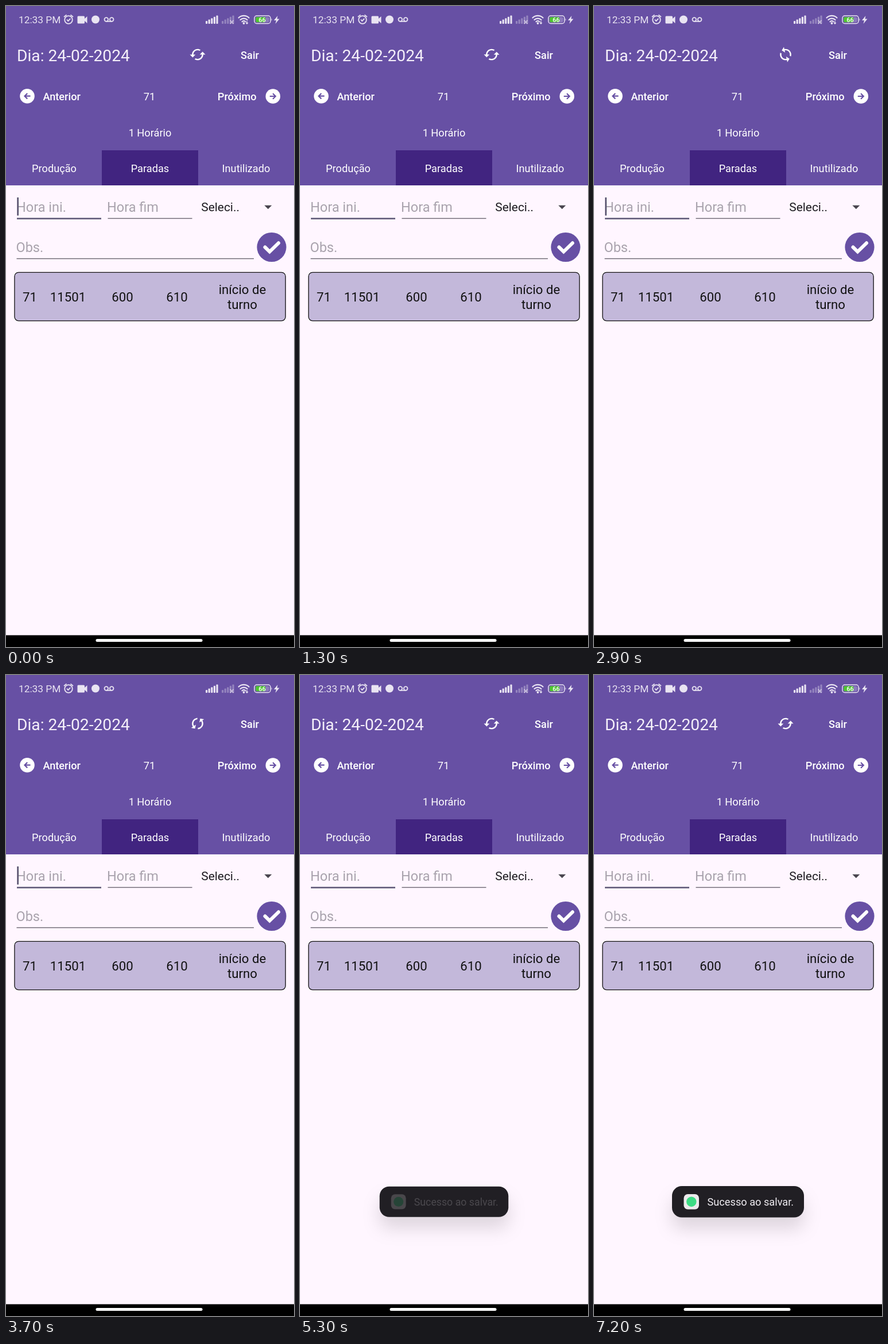
These frames come from a looping animation (502x1115 px, 7300 ms). An HTML page:

```html
<!DOCTYPE html>
<html lang="pt">
<head>
<meta charset="utf-8">
<style>
  html, body { margin: 0; width: 100%; height: 100%; overflow: hidden; background: #fff6ff; }
  svg { display: block; width: 502px; height: 1115px; font: 18.2px Roboto, sans-serif; }
  .m { text-anchor: middle; }
  .bold { font-weight: 500; }
  .status { fill: #e9e4f2; }
  .line { fill: none; stroke: #e9e4f2; stroke-width: 1.8; }
  .hint { font-size: 23.5px; fill: #a9a3ad; }
  .row { font-size: 22.2px; fill: #111; }
  #toast { transform-origin: 251px 916px; }
  #toast .box { filter: drop-shadow(0 20px 15px rgba(0, 0, 0, .13)); }
</style>
</head>
<body>
<svg viewBox="0 0 502 1115" fill="#fff">
  <rect width="502" height="1115" fill="#fff6ff"/>
  <rect width="502" height="312" fill="#6750a4"/>
  <rect x="167" y="251" width="168" height="61" fill="#412480"/>

  <!-- status bar -->
  <g class="status">
    <text x="22" y="30" font-size="17.3">12:33 PM</text>
    <g class="line">
      <circle cx="109" cy="24" r="6.8"/>
      <path d="M101 19l4.5-3.6M117 19l-4.5-3.6M106 23.5l2.3 2.6 4-4.2"/>
      <circle cx="174.800" cy="23.500" r="3.300"/>
      <circle cx="184.200" cy="23.500" r="3.300"/>
      <path d="M174.800 26.800h9.400"/>
    </g>
    <path d="M126 17.500h9.500q1.500 0 1.500 1.500v3l4.500-4v12l-4.500-4v3q0 1.500-1.500 1.500h-9.500q-1.500 0-1.500-1.500v-10q0-1.500 1.500-1.500z"/>
    <circle cx="156" cy="23.500" r="7"/>
    <g id="bars"></g>
    <path class="line" stroke-width="1.500" d="M390.500 25l6 6m0-6l-6 6" opacity=".65"/>
    <g class="line" stroke-linecap="round" style="stroke-width:2.2">
      <path d="M405.500 20.500a13 13 0 0 1 18 0M408.500 24a8.600 8.600 0 0 1 12 0M411.500 27.300a4.500 4.500 0 0 1 6 0"/>
    </g>
    <circle cx="414.500" cy="30" r="1.900"/>
    <path d="M420 26v5m-1.800-2l1.800 2 1.800-2" class="line" style="stroke-width:1.200"/>
    <rect class="line" x="433" y="17" width="28" height="13.500" rx="4" style="stroke-width:1.500"/>
    <rect x="435.300" y="19.200" width="23.400" height="9.100" rx="2" fill="#8d7bbd"/>
    <rect x="435.300" y="19.200" width="17" height="9.100" rx="2" fill="#4fc431"/>
    <path d="M462.500 21.500q2 2.200 0 4.500z"/>
    <text class="m bold" x="446.500" y="28" font-size="11" fill="#fff">66</text>
    <path d="M473.500 17l-6.500 8h4l-1.500 6 7-8.500h-4z"/>
  </g>

  <!-- header -->
  <text x="19" y="95.500" font-size="28.200" fill="#f5f0fa">Dia: 24-02-2024</text>
  <g id="sync">
    <path transform="scale(1.230) translate(-12 -12)" d="M19 8l-4 4h3c0 3.310-2.690 6-6 6-1.010 0-1.970-.250-2.800-.700l-1.460 1.460C8.970 19.540 10.430 20 12 20c4.420 0 8-3.580 8-8h3zM6 12c0-3.310 2.690-6 6-6 1.010 0 1.970.250 2.800.700l1.460-1.460C15.030 4.460 13.570 4 12 4c-4.420 0-8 3.580-8 8H1l4 4 4-4z"/>
  </g>
  <g class="bold">
    <text class="m" x="425" y="91.500">Sair</text>
    <text x="64.500" y="164">Anterior</text>
    <text x="368.800" y="164">Próximo</text>
  </g>
  <circle cx="37" cy="156.700" r="12.800"/>
  <circle cx="465.300" cy="157" r="12.800"/>
  <g fill="none" stroke="#6750a4" stroke-width="2.200">
    <path d="M42.500 156.700h-9.500m4.200-4.700l-4.700 4.700 4.700 4.700"/>
    <path d="M459.800 157h9.500m-4.200-4.700l4.700 4.700-4.700 4.700"/>
  </g>
  <g class="m">
    <text x="250" y="164">71</text>
    <text x="251" y="227">1 Horário</text>
    <text x="84" y="289">Produção</text>
    <text x="251" y="289">Paradas</text>
    <text x="418.500" y="289">Inutilizado</text>
  </g>

  <!-- form -->
  <g class="hint">
    <text x="18" y="358">Hora ini.</text>
    <text x="176" y="358">Hora fim</text>
    <text x="17.500" y="428">Obs.</text>
  </g>
  <g fill="#6a6570">
    <rect x="19" y="368.500" width="147" height="2.600" fill="#5f5a78"/>
    <rect x="177.500" y="368.800" width="147" height="1.400"/>
    <rect x="18.500" y="438.800" width="413.500" height="1.400"/>
  </g>
  <rect id="cursor" x="19.300" y="333" width="2.700" height="31.500" fill="#5a5570"/>
  <text x="340.300" y="357.300" font-size="20.900" fill="#1d1b20">Seleci..</text>
  <path d="M450.300 346.700h13l-6.500 6.600z" fill="#49454f"/>
  <circle cx="463" cy="419.500" r="25.600" fill="#6750a4"/>
  <path d="M451.500 419.500l8 7.800 15.500-15" fill="none" stroke="#fff" stroke-width="6" stroke-linecap="round"/>

  <!-- entry -->
  <rect x="14.900" y="463.300" width="472.300" height="84.300" rx="7" fill="#c3b8da" stroke="#111" stroke-width="1.300"/>
  <g class="row m">
    <text x="41.500" y="514">71</text>
    <text x="108" y="514">11501</text>
    <text x="203" y="514">600</text>
    <text x="298" y="514">610</text>
    <text x="412" y="501.300">início de</text>
    <text x="412" y="527.300">turno</text>
  </g>

  <!-- toast -->
  <g id="toast">
    <rect class="box" x="136" y="889" width="230" height="54.500" rx="17" fill="#211f24"/>
    <g id="message">
      <rect x="156.500" y="903" width="26.500" height="26.500" rx="7" fill="#eceaec"/>
      <circle cx="169.800" cy="916.200" r="8.700" fill="#3ddc84"/>
      <text x="197.500" y="923" fill="#f0edf2">Sucesso ao salvar.</text>
    </g>
  </g>

  <rect y="1094.500" width="502" height="21" fill="#000"/>
  <rect x="156.500" y="1101" width="186" height="5" rx="2.500"/>
</svg>
<script>
const LOOP = 7300, SPIN_START = 260, SPIN = 1000, TURNS = 5, TOAST_START = 5195;
const $ = id => document.getElementById(id);
const clamp = v => Math.max(0, Math.min(1, v));

// two sets of signal bars, the second one dimmed
$('bars').innerHTML = [[348, 1], [376, .35]].map(([x, opacity]) =>
  [0, 1, 2, 3, 4].map(i => {
    const h = 5 + i * 2.4;
    return `<rect x="${x + i * 4.6}" y="${31 - h}" width="3.2" height="${h}" rx="1" opacity="${opacity}"/>`;
  }).join('')).join('');

// cubic-bezier(0, 0, 0, 1)
const decelerate = x => {
  const u = Math.cbrt(x);
  return 3 * u * u - 2 * u * u * u;
};

function draw(t) {
  const turns = clamp((t - SPIN_START) / (SPIN * TURNS)) * TURNS;
  const angle = 180 * (1 - Math.cos(Math.PI * (turns % 1)));
  $('sync').setAttribute('transform', `translate(334 84.5) rotate(${angle})`);

  $('cursor').style.opacity = (t + 800) % 1000 < 500 ? 0 : 1;

  const age = t - TOAST_START;
  $('toast').style.opacity = clamp(age / 83);
  $('toast').style.transform = `scale(${.9 + .1 * decelerate(clamp(age / 333))})`;
  $('message').style.opacity = clamp((age - 50) / 283);
}

const start = performance.now();
function tick() {
  draw((performance.now() - start) % LOOP);
  requestAnimationFrame(tick);
}
tick();
</script>
</body>
</html>
```
